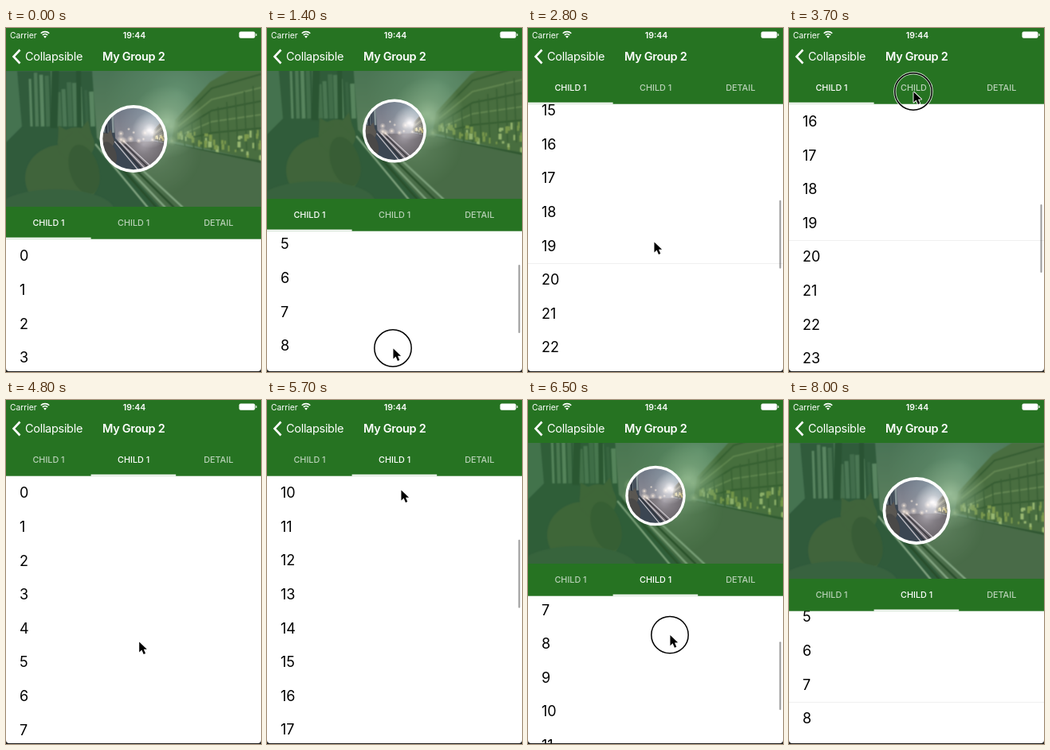
Write an HTML page with a canvas that moves like this. It is 320x433 px and loops after 8.1 s.

```html
<!DOCTYPE html>
<html lang="en">
<head>
<meta charset="utf-8">
<title>Collapsible header</title>
<style>
html, body { margin: 0; width: 100%; height: 100%; overflow: hidden; background: #fff; }
canvas { display: block; width: 100vw; height: 100vh; }
</style>
</head>
<body>
<canvas id="stage"></canvas>
<script>
const W = 320, H = 433, LOOP = 8100, STEP = 100;
const NAV = 54, TABS = 41, PHOTO = 171, FOLD = 170, ROW = 42.6, ROWS = 60;
const GREEN = '#267322', FONT = 'Inter, Roboto, sans-serif';

const canvas = document.getElementById('stage');
const ctx = canvas.getContext('2d');
const clamp = (v, a, b) => Math.min(b, Math.max(a, v));
const mix = (a, b, p) => a + (b - a) * p;
const span = (t, a, b) => clamp((t - a) / (b - a), 0, 1);
const smooth = p => p * p * (3 - 2 * p);
const settle = (p, k) => k ? (1 - Math.exp(-k * p)) / (1 - Math.exp(-k)) : p;

// Scroll keys: time, offset, decay of the glide that leads there
const FIRST = [[100, 0], [900, 390, 2], [950, 390], [1300, 208], [1400, 218], [1900, 422], [3300, 681, 2.8]];
const SECOND = [[4900, 0], [6000, 453, 3.2], [6150, 453], [6500, 302], [6950, 227, 3]];

// Touches: start, end, x, y of the first point, y of the last; between them the pointer travels
const TOUCHES = [
  [200, 600, 158, 390, 235],
  [950, 1400, 158, 221, 403],
  [1400, 1700, 158, 403, 269],
  [3650, 3850, 156, 80, 80],
  [4900, 5250, 168, 330, 113],
  [6200, 6650, 178, 146, 348],
  [7000, 7000, 186, 450, 450],
];
const TRAVEL = 500;

// The header folds with scroll distance, limited to its own height
function scrollAt(keys, t, fold) {
  let [t0, s] = keys[0];
  for (const [t1, s1, k] of keys.slice(1)) {
    if (t <= t0) break;
    const next = mix(s, s1, settle(span(t, t0, t1), k));
    fold = clamp(fold + next - s, 0, FOLD);
    s = next;
    t0 = t1;
  }
  return { s, fold };
}

function pointerAt(t) {
  const i = TOUCHES.findIndex(touch => touch[1] > t || touch[0] > t);
  if (i < 0 || t < STEP) return null;
  const [from, to, x, y0, y1] = TOUCHES[i];
  if (t >= from) return { x, y: mix(y0, y1, smooth(span(t, from, to))), down: true };
  const [, end, lastX, , lastY] = TOUCHES[Math.max(0, i - 1)];
  if (!i) return { x, y: y0 };
  const p = smooth(span(t, Math.max(end, from - TRAVEL), from));
  return { x: mix(lastX, x, p), y: mix(lastY, y0, p) };
}

function shape(c, color, ...pts) {
  c.fillStyle = color;
  c.beginPath();
  for (let i = 0; i < pts.length; i += 2) c.lineTo(pts[i], pts[i + 1]);
  c.fill();
}

function line(c, color, width, ...pts) {
  c.strokeStyle = color;
  c.lineWidth = width;
  c.beginPath();
  for (let i = 0; i < pts.length; i += 2) c.lineTo(pts[i], pts[i + 1]);
  c.stroke();
}

function oval(c, color, x, y, rx, ry, turn = 0) {
  c.fillStyle = color;
  c.beginPath();
  c.ellipse(x, y, rx, ry, turn, 0, 7);
  c.fill();
}

function glow(c, x, y, r, rgb, a) {
  const g = c.createRadialGradient(x, y, 0, x, y, r);
  g.addColorStop(0, `rgba(${rgb},${a})`);
  g.addColorStop(0.4, `rgba(${rgb},${a * 0.45})`);
  g.addColorStop(1, `rgba(${rgb},0)`);
  c.fillStyle = g;
  c.fillRect(x - r, y - r, 2 * r, 2 * r);
}

function seeded(seed) {
  return () => (seed = seed * 16807 % 2147483647) / 2147483647;
}

function paintScene() {
  const art = document.createElement('canvas');
  art.width = W * 2;
  art.height = PHOTO * 2;
  const c = art.getContext('2d');
  const rand = seeded(41);
  c.scale(2, 2);
  const sky = c.createLinearGradient(0, 0, 0, PHOTO);
  sky.addColorStop(0, '#6c7584');
  sky.addColorStop(0.5, '#8d8c95');
  sky.addColorStop(1, '#5b5963');
  c.fillStyle = sky;
  c.fillRect(0, 0, W, PHOTO);
  glow(c, 215, 30, 90, '165,185,195', 0.8);
  c.filter = 'blur(1.5px)';

  // Building: facade, ribs and seeded lights
  shape(c, '#6b6a5c', 208, 88, 212, 62, 256, 14, 280, 0, W, 0, W, 114);
  for (let i = 0; i < 5; i++) line(c, i % 2 ? '#9b987d' : '#474a42', 2, 216, 64 + i * 6, 258, 22 + i * 14, W, 4 + i * 17);
  for (let x = 222; x < W; x += 11) line(c, '#4d5047', 1.5, x, 78 - (x - 212) * 0.6, x + 3, 100);
  for (let i = 0; i < 42; i++) {
    const x = 215 + rand() * 105, y = 74 + rand() * (10 + (x - 215) * 0.25);
    c.fillStyle = rand() < 0.35 ? '#fff3b8' : '#c9bb73';
    c.fillRect(x, y, 2 + rand() * 3, 3 + rand() * 6);
  }
  line(c, '#3c3f40', 4, 205, 93, W, 115);

  // Road, compartment and streaks of light in its window
  shape(c, '#6a656a', 112, 94, 210, 92, W, 116, W, 172, 190, 172);
  glow(c, 185, 100, 60, '200,195,205', 0.6);
  shape(c, '#3b4652', 0, 0, 108, 0, 114, 84, 194, 172, 0, 172);
  shape(c, '#63737a', 0, 0, 14, 0, 20, 70, 0, 90);
  for (let x = 30; x < 110; x += 7) {
    const h = 40 + rand() * 28;
    line(c, `rgba(205,220,215,${0.1 + rand() * 0.45})`, 3 + rand() * 4, x, 68 - h, x + 2, 70);
  }
  line(c, '#2f3843', 9, 62, 0, 60, 72);
  line(c, '#2f3843', 6, 91, 0, 92, 76);
  for (let i = 0; i < 5; i++) line(c, i % 2 ? '#2e2c33' : '#d5d0d6', 2.4, 112 + i * 6, 92, 178 + i * 11, 172);

  // Cat on the seat
  const fur = '#5a5752';
  oval(c, fur, 70, 135, 46, 42);
  oval(c, fur, 88, 92, 23, 21);
  shape(c, fur, 65, 92, 66, 69, 82, 78);
  shape(c, fur, 92, 76, 103, 62, 110, 92);
  oval(c, '#4a4948', 98, 124, 18, 32, -0.3);
  oval(c, '#4b535a', 62, 176, 74, 27);
  c.filter = 'none';
  for (let i = 0; i < 12; i++) glow(c, 125 + rand() * 85, 60 + rand() * 32, 4 + rand() * 7, '255,240,225', 0.9);
  glow(c, 202, 64, 46, '255,253,255', 1);
  return art;
}

const scene = paintScene();

function text(str, x, y, font, color = '#fff', align = 'left', spacing = 0) {
  ctx.font = `${font} ${FONT}`;
  ctx.fillStyle = color;
  ctx.textAlign = align;
  ctx.letterSpacing = spacing + 'px';
  ctx.fillText(str, x, y);
}

function drawList(x, head, list, still, bar) {
  const top = head + 21 - list.s;
  for (let i = 0; i < ROWS; i++) {
    const y = top + i * ROW;
    if (y < head - 30 || y > H + 30) continue;
    text(String(i), x + 17, y + 6.3, '400 18px', '#000');
    if (still && i > 6 && i % 6 === 1) {
      ctx.fillStyle = '#f0f0f0';
      ctx.fillRect(x, Math.round(y + ROW / 2), W, 1);
    }
  }
  ctx.fillStyle = `rgba(0,0,0,${0.4 * bar})`;
  ctx.beginPath();
  ctx.roundRect(x + 315.5, head + 2.4 + list.s * 0.1815, 2, 86, 1);
  ctx.fill();
}

function drawHeader(fold, tab) {
  const tabTop = NAV + PHOTO - fold, bottom = tabTop + TABS - 0.3;
  ctx.fillStyle = GREEN;
  ctx.fillRect(0, 0, W, bottom);
  const show = 1 - fold / FOLD;
  if (show > 0) {
    ctx.save();
    ctx.beginPath();
    ctx.rect(0, NAV, W, tabTop - NAV);
    ctx.clip();
    ctx.globalAlpha = 0.53 * show;
    ctx.drawImage(scene, 0, NAV - fold, W, PHOTO);
    ctx.globalAlpha = 1;
    const y = 139.5 - fold, r = 42.5 * show;
    oval(ctx, '#fff', 160, y, r, r);
    ctx.beginPath();
    ctx.arc(160, y, r * 0.91, 0, 7);
    ctx.clip();
    ctx.drawImage(scene, 160 - r * W / PHOTO, y - r, 2 * r * W / PHOTO, 2 * r);
    ctx.restore();
  }
  ['CHILD 1', 'CHILD 1', 'DETAIL'].forEach((label, i) => {
    const a = 0.68 + 0.32 * clamp(1 - Math.abs(tab - i), 0, 1);
    text(label, 53.5 + i * 106.6, tabTop + 24, '500 10.8px', `rgba(255,255,255,${a})`, 'center');
  });
  ctx.fillStyle = '#fff';
  ctx.fillRect(tab * 106.6, bottom - 2, 106.6, 2);
}

function drawNav() {
  text('Carrier', 5, 12.6, '400 10.3px');
  text('19:44', 161, 12.6, '600 10.5px', '#fff', 'center');
  ctx.strokeStyle = '#fff';
  ctx.lineWidth = 1.7;
  for (const r of [4.5, 7.4]) {
    ctx.beginPath();
    ctx.arc(49, 12, r, Math.PI * 1.25, Math.PI * 1.75);
    ctx.stroke();
  }
  shape(ctx, '#fff', 49, 12.8, 47, 10.6, 49, 9.8, 51, 10.6);
  ctx.fillStyle = '#fff';
  ctx.beginPath();
  ctx.roundRect(292.5, 4.4, 20, 8.4, 2);
  ctx.fill();
  ctx.fillRect(313.4, 7.2, 1.2, 2.8);
  line(ctx, '#fff', 2.6, 17.5, 27.5, 9.5, 36, 17.5, 44.5);
  text('Collapsible', 24, 41, '400 14.5px', '#fff', 'left', -0.3);
  text('My Group 2', 121, 41, '600 14.5px', '#fff', 'left', -0.3);
}

function drawPointer(t) {
  const at = pointerAt(t);
  if (!at) return;
  ctx.save();
  ctx.translate(at.x, at.y);
  if (at.down) {
    for (const [color, width] of [['rgba(255,255,255,.75)', 3.4], ['#000', 1.5]]) {
      ctx.strokeStyle = color;
      ctx.lineWidth = width;
      ctx.beginPath();
      ctx.arc(0, 0, 23.2, 0, 7);
      ctx.stroke();
    }
  }
  ctx.scale(0.9, 0.9);
  ctx.lineJoin = 'round';
  const arrow = [0.5, 0.5, 0.5, 15, 4, 11.8, 6.6, 17.8, 9.2, 16.7, 6.7, 10.9, 11.2, 10.7, 0.5, 0.5];
  line(ctx, '#fff', 2, ...arrow);
  shape(ctx, '#000', ...arrow);
  ctx.restore();
}

// Dark screen edge with rounded lower corners
function drawEdge() {
  ctx.fillStyle = '#1c1c1c';
  ctx.beginPath();
  ctx.rect(0, H - 20, W, 20);
  ctx.roundRect(0, H - 20, W, 19, [0, 0, 4, 4]);
  ctx.fill('evenodd');
}

function draw(t) {
  const ratio = window.devicePixelRatio || 1;
  const w = Math.round(innerWidth * ratio), h = Math.round(innerHeight * ratio);
  if (canvas.width !== w || canvas.height !== h) {
    canvas.width = w;
    canvas.height = h;
  }
  ctx.setTransform(w / W, 0, 0, h / H, 0, 0);
  ctx.fillStyle = '#fff';
  ctx.fillRect(0, 0, W, H);

  const one = scrollAt(FIRST, t, 0), two = scrollAt(SECOND, t, FOLD);
  const fold = t < 4000 ? one.fold : two.fold;
  const tab = settle(span(t, 3700, 4200), 4);
  const head = NAV + PHOTO + TABS - fold;
  const still = (keys, now) => Math.abs(now.s - scrollAt(keys, t - 16, 0).s) < 1.5;
  if (tab < 1) {
    const bar = span(t, 50, 150) * (1 - span(t, 3700, 4000));
    drawList(-tab * W, head, one, still(FIRST, one), bar);
  }
  if (tab > 0) {
    const bar = span(t, 4850, 4950) * (1 - span(t, 7000, 7300));
    drawList((1 - tab) * W, head, two, still(SECOND, two), bar);
  }
  drawHeader(fold, tab);
  drawNav();
  drawPointer(t);
  drawEdge();
}

const start = performance.now();
function tick() {
  const t = (performance.now() - start) % LOOP;
  draw(Math.floor(t / STEP) * STEP);
  requestAnimationFrame(tick);
}
tick();
</script>
</body>
</html>
```
